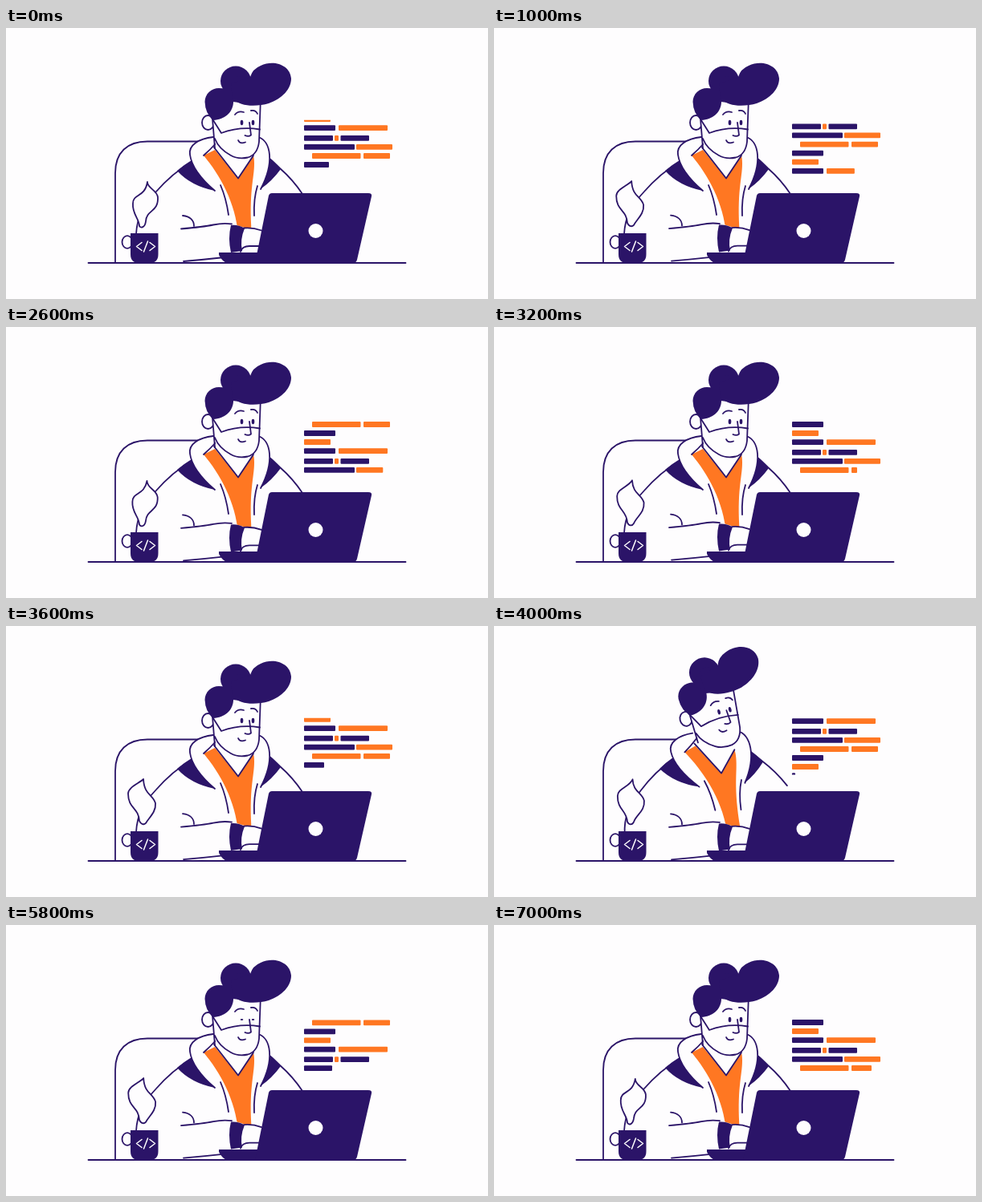
An HTML page with a canvas for the animation above (7200 ms loop, 600 by 338 pixels).

```html
<!DOCTYPE html>
<html lang="en">
<head>
<meta charset="utf-8">
<title>Coder at a desk</title>
<style>
  html, body { margin: 0; width: 100%; height: 100%; overflow: hidden; background: #fefdfe; }
  canvas { display: block; width: 600px; height: 338px; }
</style>
</head>
<body>
<canvas id="stage"></canvas>
<script>
const LOOP = 7200, STEP = 200;
const NAVY = '#2b1468', ORANGE = '#ff7722', PAPER = '#fefdfe';
const canvas = document.getElementById('stage');
const ctx = canvas.getContext('2d');
const dpr = window.devicePixelRatio || 1;
canvas.width = 600 * dpr;
canvas.height = 338 * dpr;

const mix = (a, b, k) => a + (b - a) * k;
const smooth = (a, b, x) => {
  const k = Math.min(1, Math.max(0, (x - a) / (b - a)));
  return k * k * (3 - 2 * k);
};
const pulse = (t, a, b, c, d) => smooth(a, b, t) * (1 - smooth(c, d, t));

// Linear interpolation through [x, y] keys.
function along(keys, x) {
  let i = 1;
  while (i < keys.length - 1 && x > keys[i][0]) i++;
  const [x0, y0] = keys[i - 1], [x1, y1] = keys[i];
  return mix(y0, y1, (x - x0) / (x1 - x0));
}

function shape(d, fill, stroke, width = 1.8) {
  const path = new Path2D(d);
  if (fill) { ctx.fillStyle = fill; ctx.fill(path); }
  if (stroke) { ctx.strokeStyle = stroke; ctx.lineWidth = width; ctx.stroke(path); }
}
const line = (d, width) => shape(d, null, NAVY, width);

function oval(x, y, rx, ry, fill, stroke) {
  ctx.beginPath();
  ctx.ellipse(x, y, rx, ry, 0, 0, 7);
  ctx.fillStyle = fill;
  ctx.fill();
  if (stroke) { ctx.strokeStyle = stroke; ctx.lineWidth = 1.8; ctx.stroke(); }
}

function group(draw) {
  ctx.save();
  draw();
  ctx.restore();
}

// Code block: each line has a vertical offset and bars [x, width, colour].
const LINES = [
  { y: 0, bars: [[371, 39, NAVY]] },
  { y: 11, bars: [[371, 33, ORANGE]] },
  { y: 22.2, bars: [[371, 39, NAVY], [414, 61, ORANGE]] },
  { y: 34.8, bars: [[371, 36, NAVY], [409, 5, ORANGE], [416.5, 35.5, NAVY]] },
  { y: 45.8, bars: [[371, 63, NAVY], [436, 45, ORANGE]] },
  { y: 57, bars: [[381, 60.5, ORANGE], [445, 33, ORANGE]] }
];
const BLOCK = 68;
let total = 0;
for (const row of LINES) {
  const last = row.bars[row.bars.length - 1];
  row.from = total;
  row.length = last[0] + last[1] - row.bars[0][0];
  total += row.length;
}

const TYPED = [[0, 31], [1800, 245], [3200, 438], [4000, 540], [4800, 641], [5800, 756], [7000, 920], [7200, 959]];
const SCROLL = [[-8, 0], [31, 19], [76, 25], [105, 33], [165, 33.5], [176, 36], [200, 46], [245, 46],
  [257, 48], [292, 56.6], [305, 57], [360, 57], [385, 68], [456, 68]];

function drawCode(t) {
  const typed = along(TYPED, t);
  const cycle = Math.floor((typed + 8) / total);
  const scroll = along(SCROLL, typed - cycle * total);
  group(() => {
    ctx.beginPath();
    ctx.rect(365, 114.7, 125, 70.8);
    ctx.clip();
    for (let c = cycle - 2; c <= cycle + 1; c++) {
      for (const row of LINES) {
        const shown = Math.min(row.length, typed - c * total - row.from);
        if (shown <= 0) continue;
        const y = 189.5 + row.y + (c - cycle) * BLOCK - scroll;
        const edge = row.bars[0][0] + shown;
        for (const [x, w, color] of row.bars) {
          const width = Math.min(w, edge - x);
          if (width <= 0) continue;
          ctx.fillStyle = color;
          ctx.beginPath();
          ctx.roundRect(x, y - 3.4, width, 6.8, 1);
          ctx.fill();
        }
      }
    }
  });
}

// Steam: closed curve of cubics, swaying between two poses.
const STEAM_RIGHT = [176, 192, 176, 200, 188, 202, 189, 211, 190, 230, 175, 226, 174, 241,
  173, 249, 168, 250, 166, 247, 166, 238, 157, 232, 158, 219, 158, 206, 173, 212, 176, 192];
const STEAM_LEFT = [171, 191, 172, 211, 183, 210, 186, 221, 187, 232, 178, 239, 174, 246,
  172, 248, 168, 248, 166, 243, 165, 226, 152, 228, 152, 209, 152, 201, 166, 196, 171, 191];

function drawSteam(t) {
  const sway = (1 - Math.cos(2 * Math.PI * (t + 50) / 2400)) / 2;
  const p = STEAM_RIGHT.map((v, i) => mix(v, STEAM_LEFT[i], sway));
  shape(`M${p.slice(0, 2)}C${p.slice(2)}Z`, PAPER, NAVY);
}

function drawMug() {
  oval(151, 267, 6.5, 7.8, PAPER, NAVY);
  shape('M155 256H189.5V282Q189.5 293 179 293H165.5Q155 293 155 282Z', NAVY);
  shape('M169 267.5L162.5 272.5L169 277.5M176.5 266L171.5 279M179 267.5L185.5 272.5L179 277.5', null, PAPER, 1.5);
}

function drawChair() {
  line('M136 293V181C136 155 151 141.5 176 141.5H250');
}

function drawTorso(nod) {
  group(() => {
    // Leans back around the hips and lifts the far shoulder.
    ctx.transform(1, -0.05 * nod, 0.095 * nod, 1, -23.75 * nod, 10.6 * nod);
    shape('M162 293V257C163 237 170 222 187 204C201 188 214 177 232 166L327 162L341 175L369 207L330 293Z', PAPER);
    line('M162 257C163 237 170 222 187 204C201 188 214 177 232 166M327 162L341 175Q357 189 369 207');
    shape('M213 178Q221 171 231 165Q240 184 260 203Q230 197 213 178Z', NAVY);
    shape('M328 162Q335 167 342 176Q331 191 318 200Q327 181 328 162Z', NAVY);
    shape('M258 136C240 138 227 146 229 158C231 173 245 190 260 203L282 248H306L317 200C326 184 329 170 328 158C327 147 323 139 314 136Z', PAPER);
    line('M260 203C245 190 231 173 229 158C227 146 240 138 258 136M314 136C323 139 327 147 328 158C329 170 326 184 317 201');
    shape('M246 159L260 152L289 187L307 158Q309 160 309 169C309 188 302 204 306 258H289C286 218 266 183 246 159Z', ORANGE);
    shape('M259 146L262 154L289 188L308 159V146Z', PAPER);
    line('M263 142Q254 152 246 159M259 149L289 187.5L308 159');
    line('M267 196Q274 212 277 233M313 197Q308 213 309 234');
  });
}

function drawHair(lean) {
  shape('M247.5 92C247.5 82 256 75 265 75C276 75 283.5 83 283 93C282 106 272 114 258 115Q248 107 247.5 92Z', NAVY);
  oval(286, 66, 19, 18.5, NAVY);
  shape('M282 92L317 96L321 63L286 60L268 77Z', NAVY);
  group(() => {
    ctx.translate(284, 0);
    ctx.scale(1 - 0.14 * lean, 1);
    shape('M-2 88C8 99 29 98 43 94C60 88 71 76 71 63C70 46 49 39 33 47Q23 51 20 61L-4 70Z', NAVY);
  });
}

function drawHead(nod, lean, blink) {
  group(() => {
    ctx.translate(251 - 12.5 * nod, 118 - 2 * nod);
    ctx.rotate(-12 * nod * Math.PI / 180);
    ctx.translate(-251, -118);
    oval(251.5, 118, 7.5, 9, PAPER, NAVY);
    group(() => {
      ctx.translate(-1.5 * lean, 0);
      shape('M257 100V113L261 146L280 159Q289 164 301 161.5Q313 158 315 142L317 92L260 88Z', PAPER);
      line('M257 113L260 150M260 138Q265 151 280 159Q289 164 301 161.5Q313 158 315 142L316.8 92');
      line('M256 112L268 131Q291 122.5 316 126.5');
      line('M303 118L305 133.5Q302 136 297.5 134');
      line('M289 140Q291 145 298 142.5');
      line('M285 108Q289 103 296 105M305 103Q311 102 313 107');
      const open = mix(3.3, 0.9, blink);
      oval(293.5, 118, 1.8, open, NAVY);
      oval(307.5, 118, 1.8, open, NAVY);
    });
    drawHair(lean);
  });
}

function drawArm(t, lean) {
  group(() => {
    ctx.translate(-7 * lean, lean + 0.5 * Math.sin(t / 190));
    shape('M221 291L225 249L281 244L297 249L315 251V280L268 286Z', PAPER);
    line('M220 234C229 235 234 240 234 247');
    line('M221 291Q245 289 272 286');
    line('M218 250.5Q246 248 258 245.5T281 244.5');
    shape('M280 246Q289 245 297 250Q291 264 294 278L280 280Q276 262 280 246Z', NAVY);
    line('M296 249.5Q307 248.5 318 252.5M292 279Q294 272 303 272H316');
  });
}

function drawLaptop() {
  shape('M265 280H318V293H275Q269 291 265 283Z', NAVY);
  shape('M331 206H451Q456 206 455 210L437 289Q436 293 432 293H310L327 209Q328 206 331 206Z', NAVY);
  oval(385.5, 253, 9, 9, PAPER);
}

function draw(t) {
  const nod = pulse(t, 3600, 4000, 4200, 4700);
  const lean = pulse(t, 1300, 1800, 1900, 2400);
  const blink = pulse(t, 1550, 1800, 1850, 2050) + pulse(t, 5550, 5800, 5850, 6050);
  ctx.setTransform(dpr, 0, 0, dpr, 0, 0);
  ctx.lineCap = ctx.lineJoin = 'round';
  ctx.fillStyle = PAPER;
  ctx.fillRect(0, 0, 600, 338);
  drawChair();
  drawTorso(nod);
  drawHead(nod, lean, blink);
  drawArm(t, lean);
  drawLaptop();
  drawSteam(t);
  drawMug();
  line('M102.5 293H497.5');
  drawCode(t);
}

const start = performance.now();
function tick() {
  const t = (performance.now() - start) % LOOP;
  draw(Math.floor(t / STEP) * STEP);
  requestAnimationFrame(tick);
}
tick();
</script>
</body>
</html>
```
